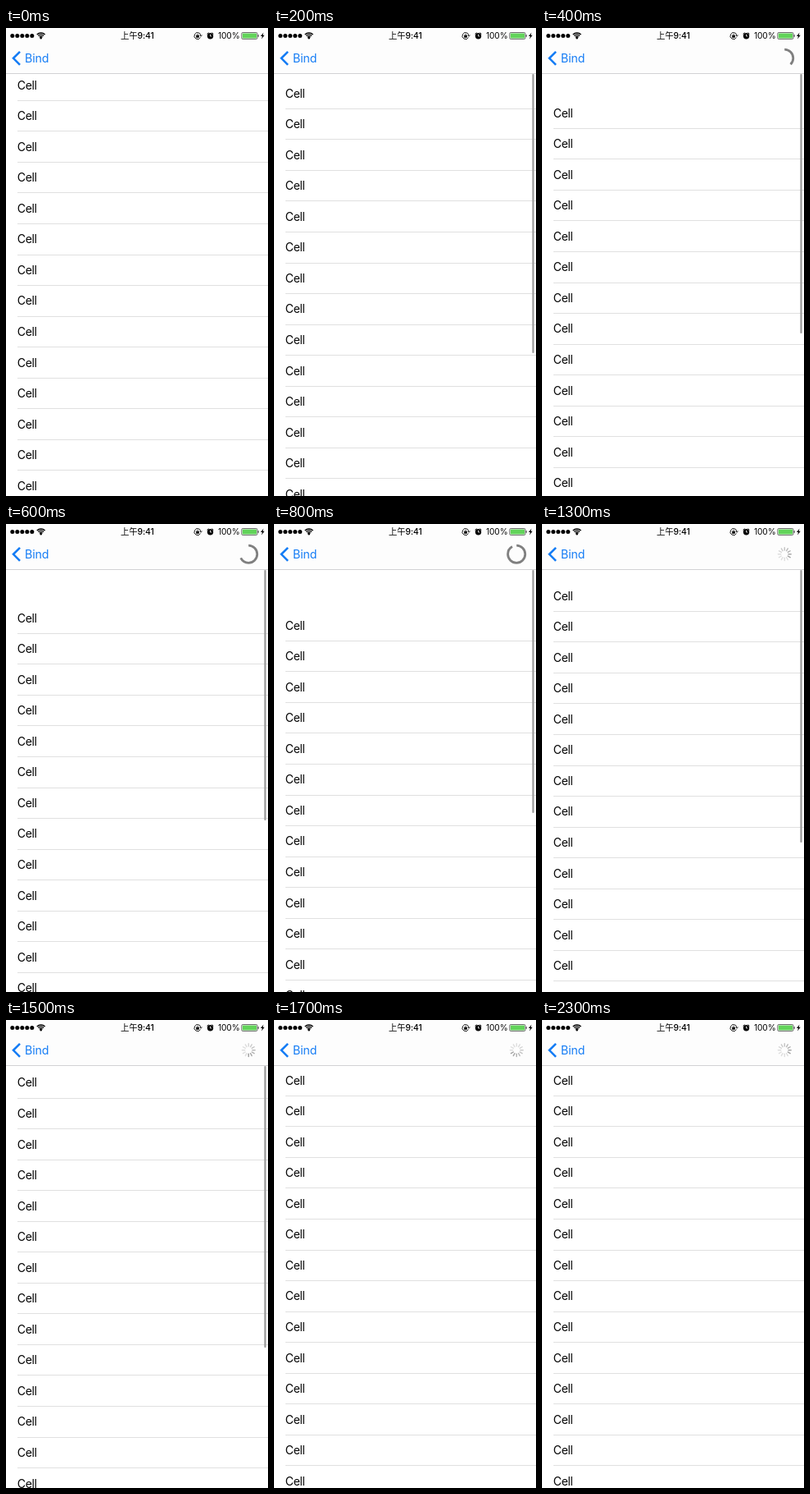
These frames come from a looping animation (320x570 px, 2400 ms). An HTML page with a canvas:

```html
<!DOCTYPE html>
<html lang="zh">
<head>
<meta charset="utf-8">
<title>Pull to refresh</title>
<style>
html, body { margin: 0; width: 100%; height: 100%; overflow: hidden; background: #fff; }
canvas { display: block; width: 320px; height: 570px; }
</style>
</head>
<body>
<canvas id="stage" width="320" height="570"></canvas>
<script>
const ctx = document.getElementById('stage').getContext('2d');
const TAU = Math.PI * 2, LOOP = 2400, STEP = 100, ROW = 37.54;
const RELEASE = 1100, MAX_PULL = 70.3, HEAD = 4;
const FONT = 'Inter, "Noto Sans CJK SC", "Noto Sans CJK JP", sans-serif';

// Pull distance while the finger drags: [ms, px]
const DRAG = [[0, -4], [200, 6], [300, 19], [400, 30], [600, 41], [800, 50], [1000, 64], [RELEASE, MAX_PULL]];

function pullAt(t) {
  if (t > RELEASE) {
    const pull = MAX_PULL * Math.exp(-(t - RELEASE) / 124);
    return pull < 1 ? 0 : pull;
  }
  const i = Math.max(1, DRAG.findIndex(([ms]) => ms >= t));
  const [t0, y0] = DRAG[i - 1], [t1, y1] = DRAG[i];
  return y0 + (y1 - y0) * (t - t0) / (t1 - t0);
}

function rect(x, y, w, h, color) {
  ctx.fillStyle = color;
  ctx.fillRect(x, y, w, h);
}

function text(str, x, y, size, color = '#000', weight = 400, spacing = 0) {
  ctx.font = `${weight} ${size}px ${FONT}`;
  ctx.letterSpacing = spacing + 'px';
  ctx.fillStyle = color;
  ctx.fillText(str, x, y);
}

function dot(x, y, r, color = '#000') {
  ctx.fillStyle = color;
  ctx.beginPath();
  ctx.arc(x, y, r, 0, TAU);
  ctx.fill();
}

function arc(x, y, r, from, to, width, color = '#000') {
  ctx.lineWidth = width;
  ctx.strokeStyle = color;
  ctx.beginPath();
  ctx.arc(x, y, r, from, to);
  ctx.stroke();
}

function line(points, width, color = '#000') {
  ctx.lineWidth = width;
  ctx.strokeStyle = color;
  ctx.beginPath();
  points.forEach(([x, y]) => ctx.lineTo(x, y));
  ctx.stroke();
}

function drawList(pull, t) {
  for (let y = 74 + pull; y < 590; y += ROW) {
    text('Cell', 13.7, Math.floor(y + 5.2), 14, '#000', 400, -0.3);
    rect(14, Math.floor(y + 18.3), 306, 1, '#e0e0e0');
  }
  ctx.globalAlpha = t < 200 || t > 1600 ? 0 : t === 1600 ? 0.5 : 1;
  ctx.fillStyle = '#989898';
  ctx.beginPath();
  ctx.roundRect(315.4, 56, 2.2, 346 - pull, 1.1);
  ctx.fill();
  ctx.globalAlpha = 1;
}

function drawStatus() {
  for (let i = 0; i < 5; i++) dot(7.8 + i * 6, 9.6, 2.5);

  const up = -TAU / 4;
  for (const r of [2.6, 4.8, 7]) arc(42.7, 13, r, up - 0.78, up + 0.78, 1.4);
  dot(42.7, 12.2, 1.2);

  text('上午9:41', 140, 13, 10.4, '#000', 500, -0.1);

  // Rotation lock
  arc(234, 9.6, 4, 0.5, TAU - 0.15, 0.9);
  rect(232.2, 9, 3.6, 2.8, '#000');
  arc(234, 9, 1.2, Math.PI, TAU, 0.7);
  line([[236.7, 8.7], [238.1, 10.2], [239.5, 8.7]], 0.9);

  // Alarm clock
  dot(249.5, 9.8, 3.7);
  line([[245.7, 7.3], [247.5, 5.7]], 1);
  line([[251.5, 5.7], [253.3, 7.3]], 1);
  line([[249.5, 7.6], [249.5, 10], [251.2, 10]], 0.8, '#fff');

  text('100%', 259, 13, 10.2, '#000', 400, -0.1);

  // Battery and bolt
  ctx.lineWidth = 0.7;
  ctx.strokeStyle = '#333';
  ctx.beginPath();
  ctx.roundRect(287.8, 5.5, 19.2, 8, 1.4);
  ctx.stroke();
  rect(288.8, 6.5, 17.2, 6, '#62d35a');
  rect(307.5, 8.2, 1.1, 2.6, '#333');
  ctx.fillStyle = '#000';
  ctx.beginPath();
  [[314.5, 5.5], [311, 10], [313, 10], [312, 13.6], [315.7, 8.8], [313.6, 8.8]]
    .forEach(p => ctx.lineTo(...p));
  ctx.fill();
}

function drawSpinner(t) {
  const head = (HEAD + Math.floor((t - 1300) * 12 / 1000) + 24) % 12;
  ctx.lineCap = 'round';
  for (let i = 0; i < 12; i++) {
    const a = i * TAU / 12 - TAU / 4, age = (head - i + 12) % 12;
    const grey = Math.min(222, 158 + age * 9);
    const c = Math.cos(a), s = Math.sin(a);
    line([[296.3 + 4.6 * c, 36.7 + 4.6 * s], [296.3 + 7.9 * c, 36.7 + 7.9 * s]], 1.4,
      `rgb(${grey},${grey},${grey})`);
  }
  ctx.lineCap = 'butt';
}

function drawNav(pull, t) {
  rect(0, 0, 320, 55, '#fdfdfd');
  rect(0, 55, 320, 1, '#d2d2d4');
  drawStatus();
  line([[17, 28.8], [9, 36.8], [17, 44.8]], 2.6, '#147cf5');
  text('Bind', 23, 42, 14.2, '#147cf5', 400, -0.1);

  if (t > RELEASE) return drawSpinner(t);
  const progress = Math.min(1, (pull - 16) / 37);
  if (progress > 0) arc(296.2, 36.7, 10.6, -TAU / 4, (progress - 0.25) * TAU, 2.8, '#808080');
}

function frame(now) {
  const step = Math.floor(now % LOOP / STEP) * STEP;
  const t = step < 200 ? 0 : step;
  const pull = pullAt(t);
  rect(0, 0, 320, 570, '#fff');
  drawList(pull, t);
  drawNav(pull, t);
  requestAnimationFrame(frame);
}
requestAnimationFrame(frame);
</script>
</body>
</html>
```
